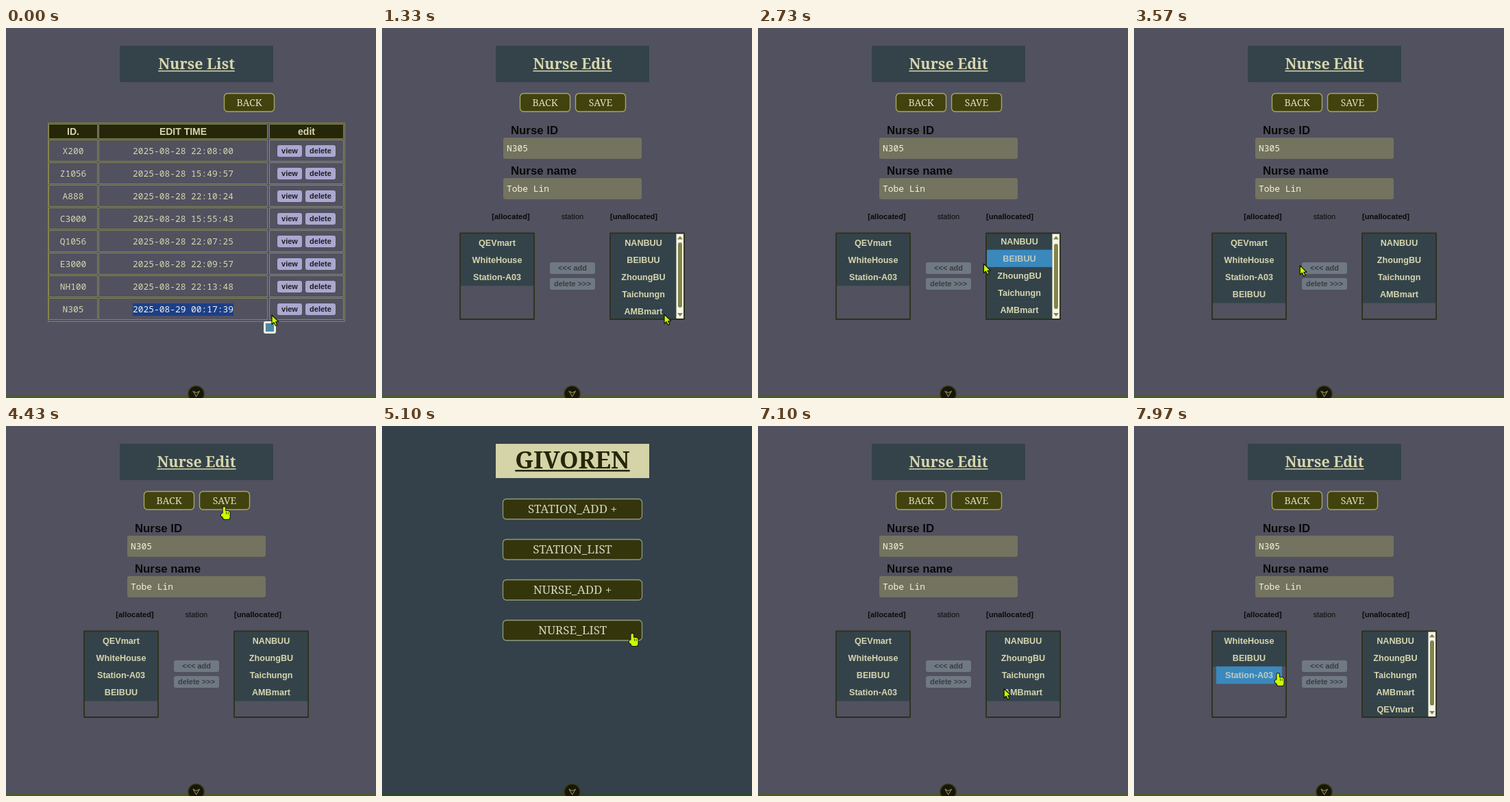
These frames come from a looping animation (540x540 px, 8000 ms). An HTML page with a canvas:

```html
<!DOCTYPE html>
<html lang="en">
<head>
<meta charset="utf-8">
<title>Nurse admin</title>
<style>
html, body { margin: 0; width: 100%; height: 100%; overflow: hidden; background: #515160; }
canvas { display: block; width: 540px; height: 540px; }
</style>
</head>
<body>
<canvas id="stage" width="540" height="540"></canvas>
<script>
const ctx = document.getElementById('stage').getContext('2d');
const LOOP = 8000;
const SERIF = '"Noto Serif", Georgia, serif';
const SANS = '"Liberation Sans", Arial, sans-serif';
const MONO = '"Noto Sans Mono", Consolas, monospace';
const CREAM = '#d6d6ae', SLATE = '#34434a', DARK = '#26260a', OLIVE = '#42420f';

// Page changes: [start, page]
const PAGES = [[0, 'list'], [870, 'edit'], [4560, 'home'], [5600, 'list'], [6860, 'edit']];

// Pointer path: [time, x, y]
const PATH = [
  [30, 388, 419], [600, 411, 411], [900, 411, 412], [1300, 412, 418],
  [1570, 412, 418], [1930, 417, 340], [2400, 416, 339], [3000, 266, 348],
  [3320, 262, 348], [3480, 243, 347], [3700, 241, 346], [4030, 285, 305],
  [4350, 318, 118], [4970, 322, 116], [5100, 365, 303], [5600, 365, 303],
  [6030, 108, 400], [6330, 105, 401], [6650, 411, 410], [7000, 405, 405],
  [7330, 200, 309], [7430, 200, 309], [7600, 278, 371], [7680, 276, 371],
  [7900, 210, 361]
];

// Times at which the pointer switches between arrow and hand
const SWITCHES = [300, 890, 1650, 2680, 2980, 3440, 4300, 5620, 6600, 6890, 7250, 7700, 7850];

const NURSES = [
  ['X200', '28 22:08:00'], ['Z1056', '28 15:49:57'], ['A888', '28 22:10:24'],
  ['C3000', '28 15:55:43'], ['Q1056', '28 22:07:25'], ['E3000', '28 22:09:57'],
  ['NH100', '28 22:13:48'], ['N305', '29 00:17:39']
];

const SHOP = 'QEVmart';
const REST = ['ZhoungBU', 'Taichungn', 'AMBmart'];
// Station lists: [start, allocated, unallocated]
const STATIONS = [
  [0, [SHOP, 'WhiteHouse', 'Station-A03'], ['NANBUU', 'BEIBUU', ...REST]],
  [3320, [SHOP, 'WhiteHouse', 'Station-A03', 'BEIBUU'], ['NANBUU', ...REST]],
  [6860, [SHOP, 'WhiteHouse', 'BEIBUU', 'Station-A03'], ['NANBUU', ...REST]],
  [7660, ['WhiteHouse', 'BEIBUU', 'Station-A03'], ['NANBUU', ...REST, SHOP]]
];

const between = (t, a, b) => t >= a && t < b;
const latest = (steps, t) => steps.filter(s => s[0] <= t).pop();

function text(str, x, y, font, color, align = 'center') {
  ctx.font = font;
  ctx.fillStyle = color;
  ctx.textAlign = align;
  ctx.fillText(str, x, y);
}

function rect(x, y, w, h, color) {
  ctx.fillStyle = color;
  ctx.fillRect(x, y, w, h);
}

function paint(fill, stroke, line) {
  if (fill) { ctx.fillStyle = fill; ctx.fill(); }
  if (stroke) { ctx.strokeStyle = stroke; ctx.lineWidth = line; ctx.stroke(); }
}

function box(x, y, w, h, r, fill, stroke, line = 1) {
  ctx.beginPath();
  ctx.roundRect(x, y, w, h, r);
  paint(fill, stroke, line);
}

function shape(points, fill, stroke, line = 1) {
  ctx.beginPath();
  points.forEach(([x, y]) => ctx.lineTo(x, y));
  ctx.closePath();
  ctx.lineJoin = 'round';
  paint(fill, stroke, line);
}

function title(str, h, size, base, bg, color, rule) {
  rect(166, 26, 224, h, bg);
  text(str, 278, base, `bold ${size}px ${SERIF}`, color);
  const w = ctx.measureText(str).width;
  rect(278 - w / 2, base + 2, w, rule, color);
}

const pageTitle = str => title(str, 53, 21.5, 60, SLATE, CREAM, 1.5);

function button(str, x) {
  box(x + .5, 95.5, 73, 26.5, 5, OLIVE, '#a6a66a', 1.4);
  text(str, x + 37, 114, `14px ${SERIF}`, '#dedebc');
}

function smallButton(str, x, y, w, fill, color) {
  box(x, y, w, 17, 3, fill);
  text(str, x + w / 2, y + 12, `bold 11px ${SANS}`, color);
}

function drawHome() {
  title('GIVOREN', 50, 35, 62, '#d5d4a8', DARK, 2.5);
  ['STATION_ADD +', 'STATION_LIST', 'NURSE_ADD +', 'NURSE_LIST'].forEach((label, i) => {
    const y = 106.5 + i * 59;
    box(176.5, y, 203, 29.5, 5, '#35350c', '#8f9a7c', 1.3);
    text(label, 278, y + 20.5, `17px ${SERIF}`, '#d4d6c0');
  });
}

function drawList(t) {
  pageTitle('Nurse List');
  button('BACK', 318);
  const line = '#85854c';
  const columns = [[62.5, 71], [135.5, 246], [384.5, 108]];
  box(61.5, 138.5, 433, 290, 0, null, line);
  ['ID.', 'EDIT TIME', 'edit'].forEach((head, i) => {
    const [x, w] = columns[i];
    box(x, 140.5, w, 21, 0, DARK, line);
    text(head, x + w / 2, 155.5, `bold 14px ${SANS}`, CREAM);
  });
  NURSES.forEach(([id, time], i) => {
    const mid = 179.5 + i * 33.07;
    const top = Math.round(mid - 15.5) - .5;
    columns.forEach(([x, w], c) => box(x, top, w, 31, 0, null, c === 2 ? '#85877a' : line));
    const last = i === NURSES.length - 1;
    const selected = last && t < 60;
    if (selected) rect(185, 402, 147, 18, '#1c3f88');
    const stamp = '2025-08-' + (last && t > 5000 ? '29 00:17:56' : time);
    text(id, 98, mid + 4.5, `12.9px ${MONO}`, CREAM);
    text(stamp, 258.5, mid + 4.5, `12.9px ${MONO}`, selected ? '#f2f2e0' : CREAM);
    const y = Math.round(mid - 9);
    smallButton('view', 396, y, 36, '#aaa8d0', '#1d1d20');
    smallButton('delete', 437, y, 44, '#aaa8d0', '#1d1d20');
  });
  if (t < 60) {
    box(376, 428, 18, 18, 3, '#eeeede');
    rect(379, 431, 12, 12, '#4f88a4');
  }
}

function scrollbar(x, scroll) {
  rect(x, 300, 12, 125, '#f7f7e8');
  box(x + 2.5, 313 + scroll, 6, 95, 3, '#83834c');
  const arrow = (y, tip) => shape([[x + 1.5, y], [x + 5.5, y + tip], [x + 9.5, y]], '#83834c');
  arrow(308.5, -5);
  arrow(416, 5);
}

function stationList(x, items, scroll, pointer, selected) {
  const scrolls = items.length > 4 && x > 300;
  const mid = x + (scrolls ? 49 : 54.5);
  const width = scrolls ? 96 : 107;
  ctx.save();
  ctx.beginPath();
  ctx.rect(x + 1, 300, 107, 125);
  ctx.clip();
  items.forEach((name, i) => {
    const top = 300.5 + i * 25.2 - scroll;
    const hover = pointer.hand && Math.abs(pointer.x - mid) < width / 2 &&
      between(pointer.y + 3, top, top + 25.2);
    const lit = hover || name === selected;
    const w = lit ? 96 : width;
    rect(mid - w / 2, top, w, 25.4, lit ? '#3b88bd' : SLATE);
    text(name, mid, top + 17, `bold 12.6px ${SANS}`, lit ? '#bccbc4' : CREAM);
  });
  if (scrolls) scrollbar(x + 97, scroll);
  ctx.restore();
  box(x + .5, 299.5, 108, 125.5, 0, null, '#2d3018', 1.8);
}

function field(label, value, y) {
  text(label, 188, y - 5, `bold 16.8px ${SANS}`, '#090907', 'left');
  box(177, y, 202, 31, 3, '#737360');
  text(value, 182, y + 20, `12.9px ${MONO}`, '#f5f5d2', 'left');
}

function drawEdit(t, pointer) {
  pageTitle('Nurse Edit');
  button('BACK', 201);
  button('SAVE', 282);
  field('Nurse ID', 'N305', 160);
  field('Nurse name', 'Tobe Lin', 219);
  text('[allocated]', 188, 279, `bold 11.1px ${SANS}`, '#0b0b08');
  text('station', 278, 279, `11px ${SANS}`, '#0b0b08');
  text('[unallocated]', 367.5, 279, `bold 11.1px ${SANS}`, '#0b0b08');
  const [, allocated, unallocated] = latest(STATIONS, t);
  const selected = between(t, 2300, 3320) ? 'BEIBUU' : between(t, 7380, 7660) ? SHOP : '';
  stationList(113.5, allocated, 0, pointer, selected);
  stationList(332.5, unallocated, between(t, 1640, 3320) ? 2 : 0, pointer, selected);
  smallButton('<<< add', 245, 342, 66, '#6f7984', '#3b3c3e');
  smallButton('delete >>>', 245, 365, 66, '#6f7984', '#3b3c3e');
}

function drawFooter(home) {
  rect(0, 537.5, 540, 2.5, home ? '#2f4a16' : '#45600f');
  box(266, 522.5, 23, 23, 11.5, '#16160a', '#38380e', 1.5);
  shape([[273, 530], [277.7, 532.5], [282.5, 530], [277.7, 538]], '#16160a', '#85854e', 1.2);
}

function pointerAt(t) {
  const a = latest(PATH, t) || PATH[0];
  const b = PATH[PATH.indexOf(a) + 1] || a;
  const u = a === b ? 0 : Math.max(0, (t - a[0]) / (b[0] - a[0]));
  const k = u * u * (3 - 2 * u);
  return {
    x: a[1] + (b[1] - a[1]) * k,
    y: a[2] + (b[2] - a[2]) * k,
    hand: SWITCHES.filter(s => s <= t).length % 2 === 1
  };
}

function drawHand() {
  ctx.beginPath();
  ctx.roundRect(-1.5, 0, 3.5, 12, 1.7);
  ctx.roundRect(-1.5, 6, 10, 12, 3);
  ctx.roundRect(-4.2, 9.5, 5, 5, 2);
  paint(null, '#15180a', 2);
  paint('#c9ff00');
  rect(3, 7, .9, 4, '#3a4208');
  rect(5.6, 7.5, .9, 3.5, '#3a4208');
}

function drawPointer({ x, y, hand }) {
  ctx.save();
  ctx.translate(x, y);
  if (hand) drawHand();
  else shape([[0, 0], [0, 13.5], [3, 10.7], [5.4, 15.5], [7.8, 14.4], [5.6, 9.8], [9.8, 9.6]],
    '#c9ff00', '#15180a', 1.2);
  ctx.restore();
}

function draw(now) {
  const t = now % LOOP;
  const page = latest(PAGES, t)[1];
  const pointer = pointerAt(t);
  rect(0, 0, 540, 540, page === 'home' ? '#34414a' : '#515160');
  if (page === 'home') drawHome();
  else if (page === 'list') drawList(t);
  else drawEdit(t, pointer);
  drawFooter(page === 'home');
  drawPointer(pointer);
}

const start = performance.now();
function tick() {
  draw(performance.now() - start);
  requestAnimationFrame(tick);
}
tick();
</script>
</body>
</html>
```
